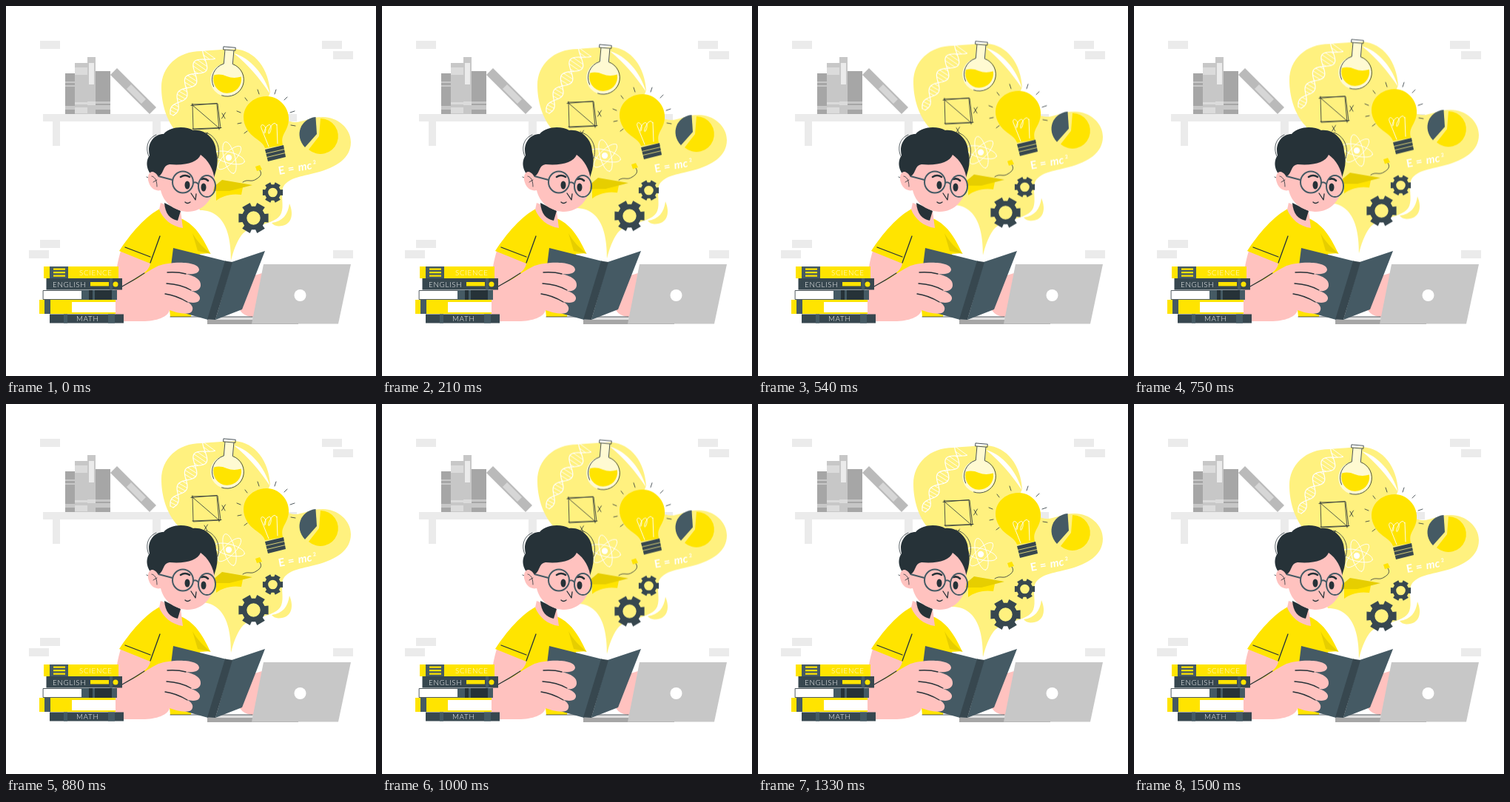
Animation of 500x500 px, one loop 1540 ms. Source, as an HTML page:

```html
<!DOCTYPE html>
<html lang="en">
<head>
<meta charset="utf-8">
<title>Studying</title>
<style>
  html, body { margin: 0; width: 100%; height: 100%; overflow: hidden; background: #fff; }
  svg { display: block; width: 100vw; height: 100vh; }
  .y { fill: #ffe400; }
  .shade { fill: #e6ce00; }
  .pale { fill: #fff17f; }
  .ink { fill: #263238; }
  .dark { fill: #37474f; }
  .slate { fill: #455a64; }
  .skin { fill: #ffc2bf; }
  .w { fill: #fff; }
  .g1 { fill: #ebebeb; }
  .g2 { fill: #c7c7c7; }
  .g3 { fill: #a6a6a6; }
  .line, .chalk { fill: none; stroke: #263238; stroke-width: .8; stroke-linecap: round; stroke-linejoin: round; }
  .chalk { stroke: #fff; stroke-width: 1.2; }
  .bold { stroke-width: 1.3; }
  .brow { stroke-width: 2.6; }
  .thin { stroke-width: .9; }
  text { font-family: Lato, "Open Sans", sans-serif; fill: #fff; }
  .title { font-size: 9.8px; letter-spacing: .7px; font-weight: 300; }
  #idea { animation: hover 1540ms linear infinite; }
  @keyframes hover {
    0%, 96.6%, 100% { transform: translateY(0); }
    47.6% { transform: translateY(-10px); }
  }
</style>
</head>
<body>
<svg viewBox="0 0 500 500">
  <!-- wall and shelf -->
  <path class="g1" d="M46 47h27v11h-27zM427 47h27v11h-27zM442 61h27v11h-27zM46 316h27v11h-27zM31 330h27v11h-27zM442 330h27v11h-27z
    M50 146h343v10H50zM63 156h10v33h-10zM198 156h11v33h-11z"/>
  <path class="g3" d="M80 91h13v55h-13zM121 88h20v58h-20z"/>
  <path class="g2" d="M80 102h13v2h-13zM80 107h13v2h-13zM80 135h13v5h-13zM121 129h20v3h-20zM121 134h20v6h-20z"/>
  <path class="g2" d="M93 77h17v69h-17zM110 69h11v77h-11z"/>
  <path fill="#dbdbdb" d="M93 83h17v10h-17zM93 130h17v3h-17zM93 137h17v8h-17zM110 129h11v5h-11z"/>
  <path class="g1" d="M112 77h7v29h-7z"/>
  <path fill="#bababa" d="M141 93l9-9 53 53-9 9z"/>
  <path fill="#d6d6d6" d="M163 112l6-6 20 20-6 6z"/>

  <g id="idea">
    <path class="pale" d="M304 344C304 318 300 276 262 276C255 262 250 200 232 172C216 155 210 130 210 110C210 82 232 61 264 61C280 60 295 58 309 58C337 60 355 85 357 117L354 124C356 138 370 152 384 156C398 160 408 150 428 150C448 150 466 165 466 184C466 206 446 218 420 225C398 231 380 232 374 246C371 256 376 270 372 280C365 297 330 294 318 310C311 320 307 332 304 344Z"/>
    <path class="w" d="M308 64C330 70 349 92 357 119C343 98 327 79 308 64Z"/>
    <path class="pale" d="M383 267C390 283 385 298 368 297.500Q362 297 359 293C374 291 381 282 383 267Z"/>

    <g id="dna" class="chalk"></g>

    <!-- flask -->
    <g transform="rotate(5 299 99)">
      <path fill="#fff" fill-opacity=".65" d="M292 58h13v20.500a22.300 22.300 0 1 1-13 0z"/>
      <path class="y" d="M280.500 95Q289 92 298 95T317.500 94A19 19 0 1 1 280.500 95Z"/>
      <path class="line" d="M290.500 55.500h16v4h-16zM292.500 60v18.500a22.300 22.300 0 0 0-11 32M304.500 60v18a22.300 22.300 0 0 1-11 43.500"/>
    </g>

    <!-- square sketch -->
    <path class="line" d="M251 133L286 132L290 165L253 167L252 132M252 134L288 165M250 134.500L285 131.500M285 133L288 167M252 166L291 164.500
      M292 145l4 7M296.500 144l-5 8M268 172l4 7M272.500 171l-5 8"/>

    <!-- atom -->
    <g transform="translate(302 205)">
      <g class="chalk thin">
        <ellipse rx="21" ry="7.500" transform="rotate(15)"/>
        <ellipse rx="22" ry="7.500" transform="rotate(75)"/>
        <ellipse rx="21" ry="7.500" transform="rotate(-45)"/>
      </g>
      <circle class="w" cx="-1" r="4.200"/>
    </g>

    <!-- bulb -->
    <path class="y" d="M350 192C346 181 334 180 326 167C312 143 330 122 352 122C374 122 389 146 379 166C374 176 372 178 374 188Z"/>
    <path class="chalk thin" d="M355 190L345 165C343 158 351 160 351 167C350 177 346 170 353 162C359 157 359 166 357 170C354 177 353 168 360 160C366 155 365 164 366 160L367 186"/>
    <path class="dark" d="M350 194L375 188L378 204L354 210Z"/>
    <path class="line" style="stroke:#fff17f" d="M351 199.500L376.500 193.500M352.500 204.500L377.500 198.500"/>
    <path class="line" d="M323 124l3 4M340 113l2 6M363 119l2-6M376 127l4-4M384 144l6-2M385 161l6 1M312 142l5 2M313 159l5-1M322 172l4-3"/>

    <!-- pie chart -->
    <path class="slate" d="M420 173L418.500 150C398 152 389 175 404 191Z"/>
    <path class="y" d="M423 176L425 152A24 24 0 1 1 409 194Z"/>

    <g transform="translate(369 228) rotate(-10)">
      <text font-size="15" font-weight="700">E<tspan x="13">=</tspan><tspan x="27" font-style="italic">mc</tspan><tspan x="48" y="-6" font-size="7">2</tspan></text>
    </g>

    <!-- cap -->
    <path class="y" d="M284 249L320 245L318 255C303 253 292 257 284 263Z"/>
    <path class="shade" d="M274 250L292 235L333 242L302 250Z"/>
    <path class="line" d="M320 238C327 233 331 239 338 234C345 230 346 226 343 222"/>
    <path class="y" d="M337 217l6-2 3 6-7 2z"/>

    <path id="gearL" class="dark" fill-rule="evenodd"/>
    <path id="gearS" class="dark" fill-rule="evenodd"/>
  </g>

  <!-- body -->
  <path class="skin" d="M336 364L346 361L336 420C326 420 320 417 316 411Z"/>
  <path class="skin" d="M156 328L197 345L205 372L195 410L148 418C147 390 145 362 156 328Z"/>
  <path class="y" d="M210 273C189 283 168 308 153 331L195 348C193 360 180 365 160 377L215 350L222 420H250L262 335L276 334C268 318 258 296 236 287Z"/>
  <path class="shade" d="M252 307C258 318 267 327 277 335L259 331Z"/>
  <path class="line bold" d="M161 326L195 339M195 347L208 311M157 379C168 373 178 367 187 361"/>
  <path class="skin" d="M209 266L236 277L239 300C224 298 212 288 207 275Z"/>
  <path class="ink" d="M214 266L236 277L232 290C222 288 215 281 214 266Z"/>

  <!-- head -->
  <path class="ink" d="M197 229C190 222 188 210 194 202C190 187 199 173 213 173C222 162 243 162 253 168C269 166 284 180 284 197C288 211 284 222 281 232L258 216L210 238Z"/>
  <path class="line" d="M203 174C191 179 188 192 193 203M270 171C283 175 291 190 286 206M190 231l2 1"/>
  <path class="skin" d="M206 231C215 224 211 216 221 214C243 216 259 211 263 201C273 208 281 221 282 236C282 264 263 279 244 278C226 276 213 266 209 249C201 251 194 245 192 235C191 224 199 219 206 231Z"/>
  <path class="line" d="M197 230C202 231 204 237 204 244M199 238L204 235"/>
  <ellipse class="ink" cx="245" cy="242" rx="3.500" ry="5.500"/>
  <ellipse class="ink" cx="267" cy="245" rx="3.500" ry="5.500"/>
  <path class="line brow" d="M236 231Q242 227 248 231M264 234Q269 232 273 236"/>
  <g fill="none" stroke="#455a64" stroke-width="2">
    <ellipse cx="239" cy="238" rx="14" ry="14.500"/>
    <ellipse cx="271.500" cy="243.500" rx="11.500" ry="14.500"/>
    <path d="M253 239Q257 237 260 241M225 235L206 230"/>
  </g>
  <path class="line bold" d="M250 253L256 262L257 254M242 265Q245 268 249 265"/>

  <!-- laptop and table -->
  <path class="g3" d="M272 423h123v7h-123z"/>
  <path fill="#e0e0e0" d="M272 420h62v4h-62z"/>
  <path class="line" d="M222 420H333"/>
  <path class="g2" d="M348 349H466L449 429.500H332Z"/>
  <circle class="w" cx="397.500" cy="391" r="8"/>

  <!-- open book -->
  <path class="slate" d="M226 327L298 345L273 424L216 408Z"/>
  <path class="slate" d="M305 346L350 331L319 410L283 424Z"/>
  <path class="dark" d="M296 344.500L306 346L283 424L272 423.500Z"/>

  <!-- hand -->
  <path class="skin" d="M148 386C170 376 185 361 206 351C222 345 260 344 261 356C261 362 251 363 243 362C256 365 264 370 263 378C262 385 254 386 250 385C261 388 264 394 261 398C258 402 250 401 245 400C253 404 254 410 250 414C244 418 229 414 221 411C219 420 204 426 184 426H158C150 426 148 410 148 398Z"/>
  <path class="line bold" d="M218 360Q232 359 243 362M217 375Q236 376 250 384M215 389Q230 391 245 400"/>

  <!-- book pile -->
  <path class="y" d="M51 352h101v16H51z"/>
  <path class="slate" d="M59 352h25v16H59z"/>
  <path class="y" d="M64 354.500h16v2.300H64zM64 359h16v2.300H64zM64 363.500h16v2.300H64z"/>
  <text class="title" x="99" y="364">SCIENCE</text>

  <path class="dark" d="M54.500 368H157v15.500H54.500z"/>
  <path class="slate" d="M140 368h4v15.500h-4z"/>
  <path class="y" d="M114 373h25v5.500h-25z"/>
  <circle class="y" cx="148" cy="376" r="3.500"/>
  <text class="title" x="63" y="379.500">ENGLISH</text>

  <path class="w" d="M50 384.500h54v12H50z"/>
  <path class="line" d="M50.500 384.500h52v12h-52z"/>
  <path class="slate" d="M102 384h48v13h-48z"/>
  <path class="ink" d="M112 384h5v13h-5zM120 384h23v13h-23z"/>

  <path class="y" d="M45 397h103v19H45z"/>
  <path class="slate" d="M52 397h8v19h-8z"/>
  <path class="w" d="M89 400h59v14H89z"/>

  <path class="dark" d="M59 416.500h100v12H59z"/>
  <path class="slate" d="M78 416.500h5v12h-5zM138 416.500h9v12h-9z"/>
  <text class="title" x="95" y="426">MATH</text>
</svg>
<script>
  const el = id => document.getElementById(id);
  const polar = (r, a) => [r * Math.cos(a), r * Math.sin(a)];
  const poly = pts => 'M' + pts.map(p => p.map(v => v.toFixed(2))).join('L');

  // Six-toothed gear outline with a round hole
  function gear(id, x, y, r, root, hole) {
    const step = Math.PI / 3, pts = [];
    for (let i = 0; i < 6; i++) {
      for (const [rad, off] of [[root, -.34], [r, -.28], [r, .28], [root, .34]]) {
        const [dx, dy] = polar(rad, (i + off) * step);
        pts.push([x + dx, y + dy]);
      }
    }
    el(id).setAttribute('d', poly(pts) +
      `ZM${x - hole} ${y}a${hole} ${hole} 0 1 0 ${2 * hole} 0a${hole} ${hole} 0 1 0 ${-2 * hole} 0Z`);
  }
  gear('gearL', 334.5, 286.5, 21, 16, 9.2);
  gear('gearS', 360.5, 252, 14.2, 11, 6.3);

  // Double helix along a quadratic curve
  const A = [224, 147], C = [244, 106], B = [274, 65], TURNS = 4.2;
  function strand(t, side) {
    const u = 1 - t;
    const at = k => u * u * A[k] + 2 * u * t * C[k] + t * t * B[k];
    const slope = k => u * (C[k] - A[k]) + t * (B[k] - C[k]);
    const len = Math.hypot(slope(0), slope(1));
    const off = side * (4.5 + 7 * t) * Math.sin(TURNS * Math.PI * t + .5);
    return [at(0) - slope(1) / len * off, at(1) + slope(0) / len * off];
  }
  const range = n => Array.from({ length: n + 1 }, (_, i) => i / n);
  const sides = [1, -1].map(s => poly(range(70).map(t => strand(t, s))));
  const rungs = range(20).map(t => poly([strand(t, 1), strand(t, -1)])).join('');
  el('dna').innerHTML = `<path d="${sides.join('')}"/><path class="thin" d="${rungs}"/>`;
</script>
</body>
</html>
```
